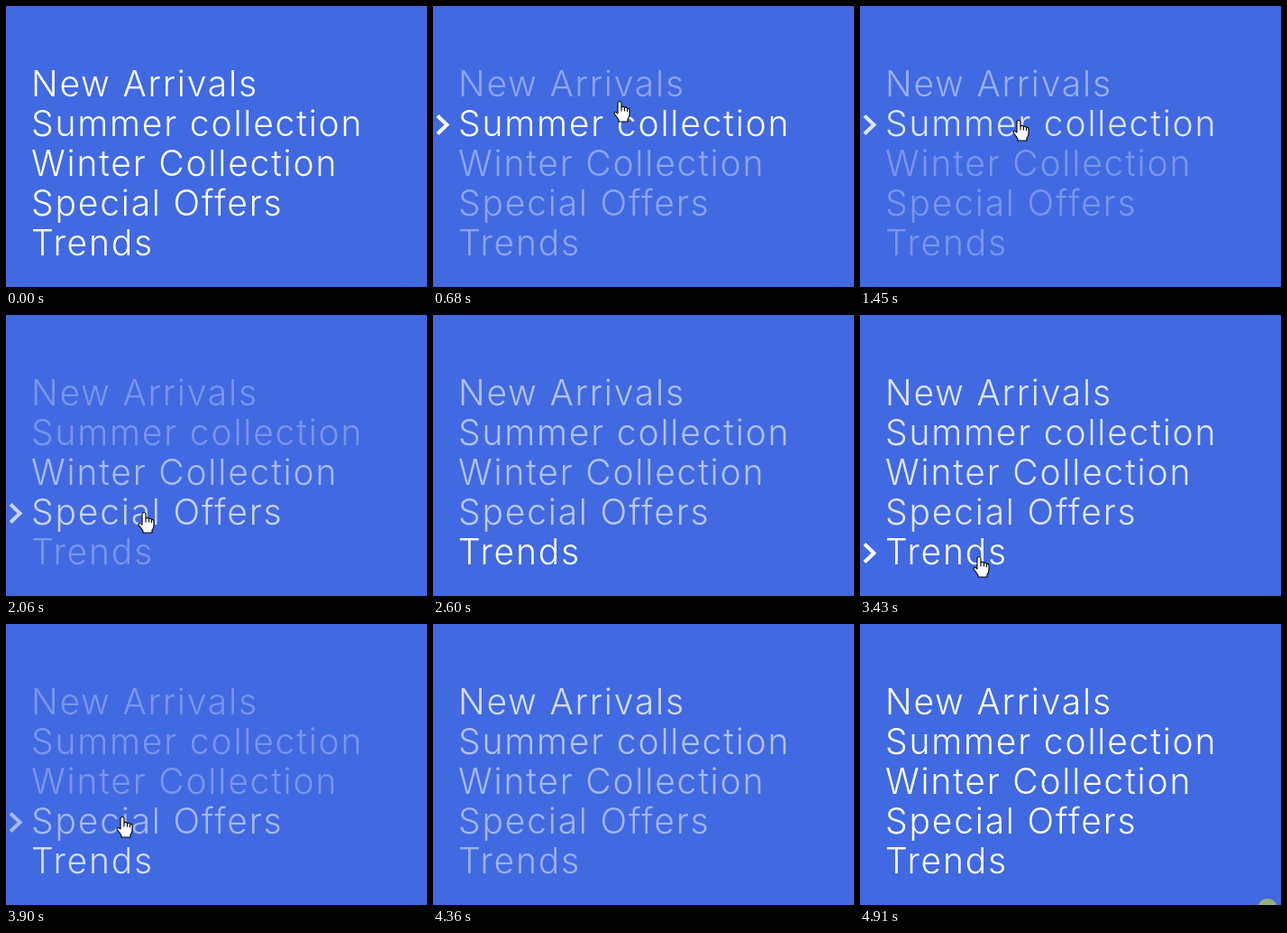
Write an HTML page that moves like this. It is 467 by 311 pixels and loops after 4980 ms.

```html
<!DOCTYPE html>
<html lang="en">
<head>
<meta charset="utf-8">
<title>Menu hover</title>
<style>
  html, body { margin: 0; width: 100%; height: 100%; overflow: hidden; background: #4169e1; }
  svg { display: block; width: 467px; height: 311px; }
  text {
    font: 300 39px Inter, "Open Sans", sans-serif;
    font-optical-sizing: none;
    letter-spacing: 1.8px;
    fill: #fff;
  }
  .chevron { fill: none; stroke: #fff; stroke-width: 4; }
  #hand { fill: #fff; stroke: #000; stroke-width: 1.1; stroke-linejoin: round; }
</style>
</head>
<body>
<svg viewBox="0 0 467 311">
  <g id="menu"></g>
  <circle id="spot" cx="452" cy="315" r="11" fill="#9aae78"/>
  <g id="hand">
    <path d="M-2 14V2Q0-1 2 2V7Q4 5.5 5.5 7.5Q7.5 6.5 8.5 8.5Q11 8 11 10.5V15Q11 18 9 20V23H-1V21Q-3 18-6 14Q-6 11-2 14Z"/>
    <path fill="none" d="M2 7V11.5M5.5 7.5V11.5M8.5 8.5V12"/>
  </g>
</svg>
<script>
const LOOP = 4980, FADE = 500, DIM = 0.3, NONE = -1;
const ROW_HEIGHT = 44, MENU_TOP = 60, MENU_RIGHT = 405;
const labels = ["New Arrivals", "Summer collection", "Winter Collection", "Special Offers", "Trends"];

// Pointer visits: key points as [time, x, y] of the fingertip
const visits = [
  [[280, 410, 289], [400, 405, 140], [680, 207, 105], [1080, 171, 91], [1450, 176, 126], [2475, 138, 280]],
  [[3280, 132, 289], [3430, 132, 267], [3700, 132, 256], [3900, 129, 213], [4270, 137, 60]]
];

const byId = id => document.getElementById(id);
const mix = (a, b, k) => a + (b - a) * k;
const hand = byId("hand"), spot = byId("spot");

byId("menu").innerHTML = labels.map((label, i) =>
  `<g transform="translate(0 ${ROW_HEIGHT * i})">
     <text x="28" y="100">${label}</text>
     <path class="chevron" d="M5 77.5L15.5 87.5L5 97.5"/>
   </g>`).join("");
const rows = [...byId("menu").children];

function pointerAt(t) {
  const path = visits.find(points => t >= points[0][0] && t < points.at(-1)[0]);
  if (!path) return null;
  const next = path.findIndex(([time]) => time > t);
  const [t0, x0, y0] = path[next - 1], [t1, x1, y1] = path[next];
  const k = (t - t0) / (t1 - t0);
  return [mix(x0, x1, k), mix(y0, y1, k)];
}

function hoveredAt(t) {
  const tip = pointerAt(t);
  if (!tip || tip[0] > MENU_RIGHT) return NONE;
  const row = Math.floor((tip[1] - MENU_TOP) / ROW_HEIGHT);
  return row < labels.length ? row : NONE;
}

// The CSS "ease" curve: cubic-bezier(.25, .1, .25, 1)
function ease(x) {
  if (x <= 0) return 0;
  if (x >= 1) return 1;
  const bezier = (a, b, s) => 3 * a * s * (1 - s) ** 2 + 3 * b * s * s * (1 - s) + s ** 3;
  let low = 0, high = 1;
  for (let i = 0; i < 20; i++) {
    const mid = (low + high) / 2;
    if (bezier(0.25, 0.25, mid) < x) low = mid; else high = mid;
  }
  return bezier(0.1, 1, low);
}

const fadeValue = (fade, t) => mix(fade.from, fade.to, ease((t - fade.start) / FADE));

// Each change of hover starts a new fade from the row's current opacity
function fadesOf(row) {
  const fades = [{ start: 0, from: 1, to: 1 }];
  for (let t = 0; t < LOOP; t += 5) {
    const hovered = hoveredAt(t), last = fades.at(-1);
    const to = hovered === NONE || hovered === row ? 1 : DIM;
    if (to !== last.to) fades.push({ start: t, from: fadeValue(last, t), to });
  }
  return fades;
}
const rowFades = labels.map((_, row) => fadesOf(row));

function show(element, visible) {
  element.style.visibility = visible ? "visible" : "hidden";
}

function draw(t) {
  const hovered = hoveredAt(t), tip = pointerAt(t);
  rows.forEach((row, i) => {
    const fade = rowFades[i].findLast(({ start }) => start <= t);
    row.setAttribute("opacity", fadeValue(fade, t));
    show(row.lastElementChild, i === hovered);
  });
  show(hand, tip);
  if (tip) hand.setAttribute("transform", `translate(${tip.map(Math.round)})`);
  show(spot, t >= 4910);
}

const begin = performance.now();
function tick() {
  draw((performance.now() - begin) % LOOP);
  requestAnimationFrame(tick);
}
tick();
</script>
</body>
</html>
```
